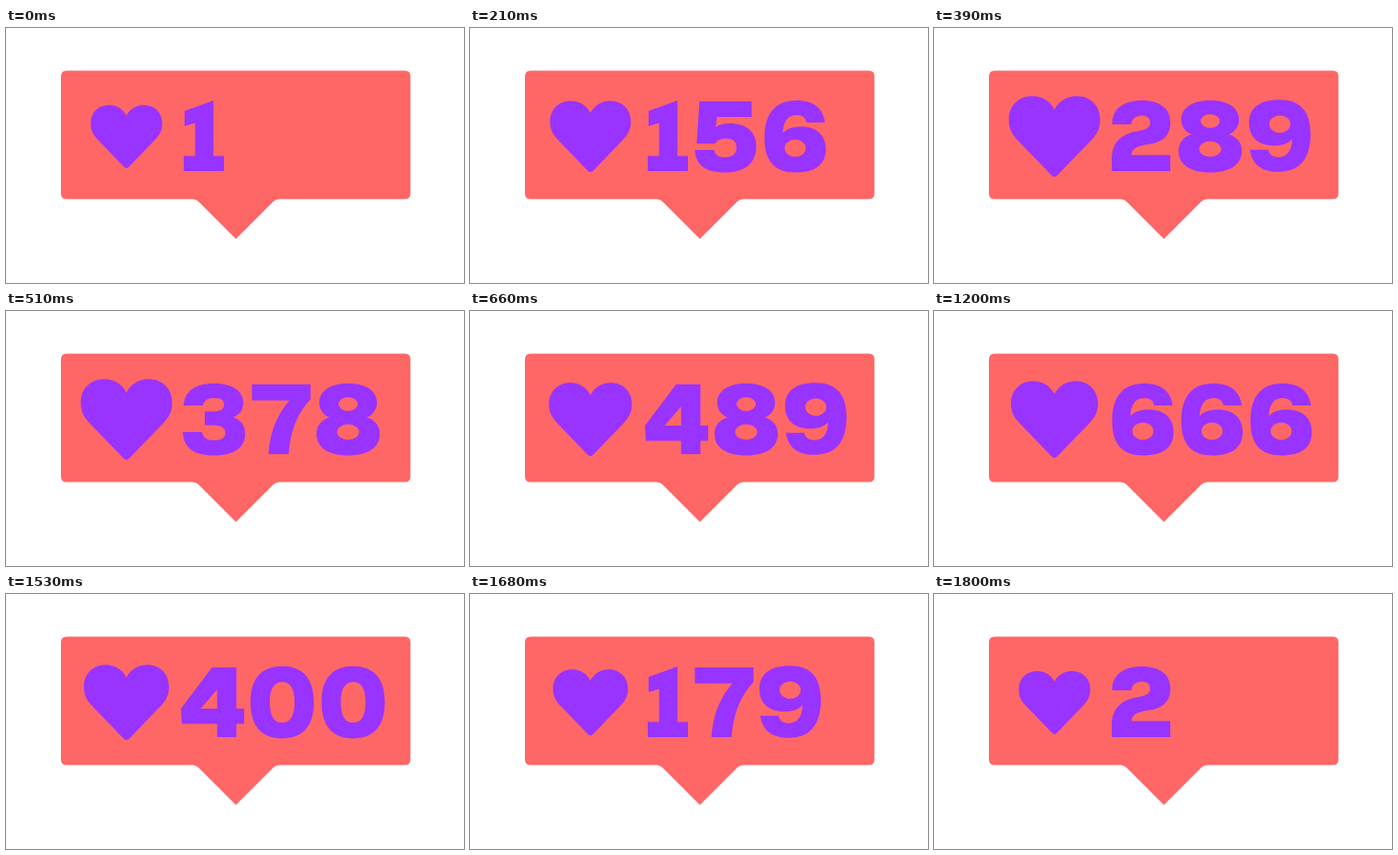
Animation, 500 px wide and 278 px high, one loop 1.83 s. Source, as an HTML page:

```html
<!DOCTYPE html>
<html lang="en">
<head>
<meta charset="utf-8">
<title>Like counter</title>
<style>
  html, body { margin: 0; width: 100%; height: 100%; overflow: hidden; background: #fff; }
  svg { display: block; width: 100vw; height: 100vh; }
  .bubble { fill: #f66; }
  .ink { fill: #93f; fill-rule: evenodd; }
</style>
</head>
<body>
<svg id="stage" viewBox="0 0 500 278" role="img">
  <defs>
    <path id="d0" d="M34.5 -.3C57 -.3 69 13 69 39S57 78.5 34.5 78.5 0 65 0 39 12 -.3 34.5 -.3Z
      M34.5 17C25.500 17 21 24 21 39S25.500 61.300 34.500 61.300 48 54 48 39 43.500 17 34.500 17Z"/>
    <path id="d1" d="M32.500 0L1 11.500V28L12.500 24.500V60.500H0V77H44V60.500H32.500Z"/>
    <path id="d2" d="M.5 26C.5 9 13 0 33 0S64 9 64 24C64 40 54 46 39 48C29 49.500 22 52 21.500 59.500H64V77H0V65
      C0 45 11 37 26 34C36 32 42 30.500 42 24.500C42 19 38.500 16.500 32.500 16.500S22 20 21.500 26Z"/>
    <path id="d3" d="M1 24C2 8 14 0 34 0S66 8 66 21C66 29 62 34 55 37C64 40 68 46 68 55C68 70 56 78.500 34 78.500
      S1 70 0 53H21C22 59 26 62 34 62S46.500 59.500 46.500 54 42 45.500 34 45.500H24V30.500H34
      C41 30.500 45 28.500 45 23S41 16 34 16 23 18.500 22 24Z"/>
    <path id="d4" d="M34 1H60.500V46H69V62.500H60.500V77H39.500V62.500H1L0 46ZM39.500 25V46H21.500Z"/>
    <path id="d5" d="M5 1H62V18H24L23 29C27 26 32 25 38 25C56 25 67 34 67 50C67 68 55 78.500 33 78.500S1 70 0 54H21
      C22 59.500 26 62 33 62S45.500 58.500 45.500 51.500 41.500 41.500 34 41.500C28 41.500 24 43.500 22 47H2Z"/>
    <path id="d6" d="M66 24C64 8 53 0 35 0C12 0 0 14 0 41C0 66 11 78.500 34 78.500C55 78.500 67 70 67 53
      C67 37 56 28.500 40 28.500C31 28.500 24 31 20 35.500C20.500 22 26 16 35 16C41 16 45 18.500 46 24Z
      M22 52a11.500 9.500 0 0 1 23 0a11.500 9.500 0 0 1 -23 0Z"/>
    <path id="d7" d="M0 1H64V17C50 32 42 50 40 77H18C20 52 27 35 41 18.500H0Z"/>
    <path id="d8" d="M34.500 0C54 0 66 8 66 21C66 28 62 34 55 37C64 40 69 46 69 55C69 70 56 78.500 34.500 78.500
      S0 70 0 55C0 46 5 40 14 37C7 34 3 28 3 21C3 8 15 0 34.500 0Z
      M24 22.500a10.500 7.500 0 0 1 21 0a10.500 7.500 0 0 1 -21 0Z
      M22.500 53a12 8.500 0 0 1 24 0a12 8.500 0 0 1 -24 0Z"/>
    <use id="d9" href="#d6" transform="rotate(180 33.5 38.9)"/>
  </defs>
  <path class="bubble" d="M66 46.500H435.500Q441.500 46.500 441.500 52.500V180.500Q441.500 186.500 435.500 186.500H299
    Q294.500 186.500 291.500 189.500L251 230L210.500 189.500Q207.500 186.500 203 186.500H66
    Q60 186.500 60 180.500V52.500Q60 46.500 66 46.500Z"/>
  <path id="heart" class="ink" d="M0 -23C-4 -30.500 -11 -34.500 -19 -34.500C-31 -34.500 -39 -26 -39 -14.500
    C-39 -6.500 -36 -2 -31.500 3L-2.500 33Q0 35.500 2.500 33L31.500 3C36 -2 39 -6.500 39 -14.500
    C39 -26 31 -34.500 19 -34.500C11 -34.500 4 -30.500 0 -23Z"/>
  <g class="ink"><use class="digit"/><use class="digit"/><use class="digit"/></g>
</svg>
<script>
  const STEP = 30, FRAMES = 61, BEAT = 30;
  const bearing = [4, 4, 4, 3, 1, 3.5, 4.5, 3.5, 4, 4];
  const advance = [77.5, 52, 73, 75, 73, 75, 75.5, 70, 77, 75.5];
  const stage = document.getElementById('stage');
  const heart = document.getElementById('heart');
  const slots = document.querySelectorAll('.digit');

  // Count up to 666, hold, then drop back at double speed.
  function countAt(frame) {
    if (frame < 30) return Math.round(1 + 665 * frame / 30);
    if (frame < 45) return 666;
    return Math.round(666 - 664 * (frame - 45) / 15);
  }

  function showNumber(value) {
    const text = String(value);
    let x = 190;
    slots.forEach((slot, i) => {
      const shown = i < text.length;
      slot.style.display = shown ? '' : 'none';
      if (!shown) return;
      const digit = +text[i];
      slot.setAttribute('href', '#d' + digit);
      slot.setAttribute('transform', `translate(${x + bearing[digit]} 79)`);
      x += advance[digit];
    });
    stage.setAttribute('aria-label', text + ' likes');
  }

  function draw(frame) {
    const scale = 1.145 - 0.145 * Math.cos(2 * Math.PI * frame / BEAT);
    heart.setAttribute('transform', `translate(131.5 118.4) scale(${scale})`);
    showNumber(countAt(frame));
  }

  const start = performance.now();
  function tick() {
    const elapsed = performance.now() - start + 0.5;
    draw(Math.floor(elapsed / STEP) % FRAMES);
    requestAnimationFrame(tick);
  }
  tick();
</script>
</body>
</html>
```
